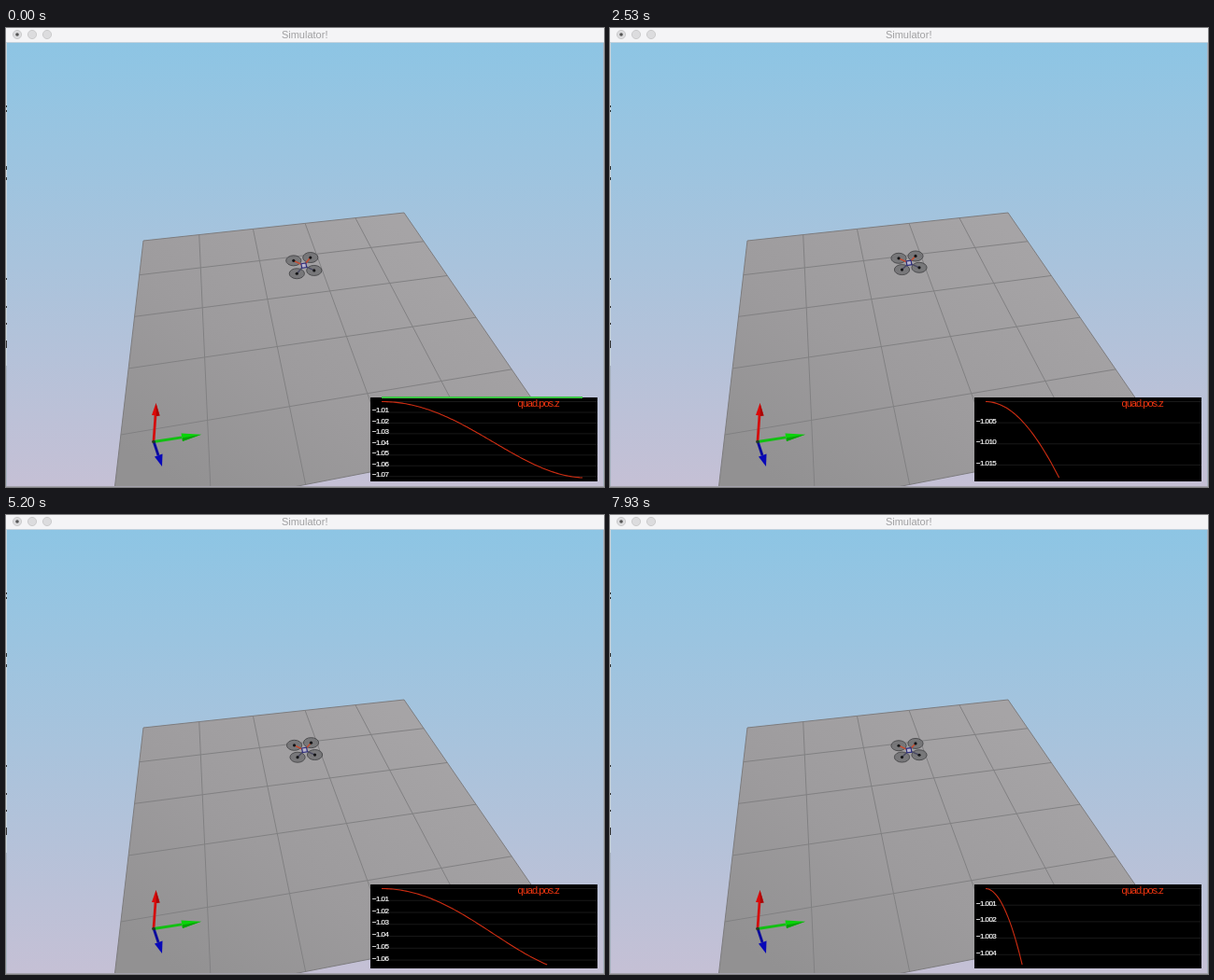
Write an HTML page that moves like this. It is 640 px wide and 492 px high and loops after 8 s.

```html
<!DOCTYPE html>
<html lang="en">
<head>
<meta charset="utf-8">
<title>Simulator</title>
<style>
html, body { margin: 0; width: 100%; height: 100%; overflow: hidden; background: #c4c1d6; }
svg { display: block; width: 100%; height: 100%; }
text { font-family: "Liberation Sans", Arial, sans-serif; }
</style>
</head>
<body>
<svg viewBox="0 0 640 492">
  <defs>
    <linearGradient id="sky" x1="0" y1="0" x2="0" y2="1">
      <stop offset="0" stop-color="#8dc5e4"/>
      <stop offset=".5" stop-color="#a9c3dc"/>
      <stop offset="1" stop-color="#c5c0d5"/>
    </linearGradient>
    <linearGradient id="shade" gradientUnits="userSpaceOnUse" x1="400" y1="200" x2="200" y2="500">
      <stop offset="0" stop-color="#a6a4a6"/>
      <stop offset=".55" stop-color="#9d9b9d"/>
      <stop offset="1" stop-color="#929192"/>
    </linearGradient>
  </defs>
  <rect y="15" width="640" height="477" fill="url(#sky)"/>
  <path id="floor" fill="url(#shade)" stroke="#7d7c7e"/>
  <path id="grid" fill="none" stroke="#818082"/>

  <g id="axes">
    <path d="M158 443L160 415" stroke="#d40d0d" stroke-width="2.8"/>
    <path d="M160.5 402L164.5 415.5L156 415Z" fill="#dc0808"/>
    <path d="M160.5 402L164.5 415.5L161 416Z" fill="#a80505"/>
    <path d="M158 443.5L188 438.8" stroke="#12c012" stroke-width="2.8"/>
    <path d="M209 435.8L187.5 434.5L189 443Z" fill="#08d408"/>
    <path d="M209 435.8L188.5 439.5L189 443Z" fill="#08a008"/>
    <path d="M158 443L163 458" stroke="#0a0a9c" stroke-width="2.8"/>
    <path d="M167 470L159 459.5L167.5 456.5Z" fill="#0808b8"/>
    <circle cx="158" cy="443.5" r="1.8" fill="#223a22"/>
  </g>

  <g id="drone"></g>

  <rect x="390" y="396" width="243" height="90" fill="#000"/>
  <g id="ticks" font-size="8" letter-spacing="-.6" fill="#fff"></g>
  <path id="curve" fill="none" stroke="#cf2d12" stroke-width="1.1"/>
  <path id="ok" stroke="#3cc544" stroke-width="2.2"/>
  <text x="547.5" y="405.7" font-size="11" letter-spacing="-.95" fill="#ee3510">quad.pos.z</text>

  <rect width="640" height="15" fill="#f4f4f6"/>
  <path d="M0 15.5H640" stroke="#c3d3de"/>
  <g fill="#dcdcde" stroke="#c4c4c6" stroke-width=".8">
    <circle cx="12" cy="7" r="4.6"/><circle cx="28" cy="7" r="4.6"/><circle cx="44" cy="7" r="4.6"/>
  </g>
  <circle cx="12" cy="7" r="1.8" fill="#555"/>
  <text x="319.7" y="11" font-size="11" fill="#a0a0a2" text-anchor="middle">Simulator!</text>

  <path d="M.5 16V362" stroke="#c9d6df"/>
  <path d="M.5 362V492M639.5 16V492" stroke="#a9b4c2"/>
  <path d="M.5 83v2m0 3v2M.5 148v4m0 8v3M.5 268v2m0 28v2m0 16v2M.5 335v8" stroke="#333"/>
  <path d="M0 491.5H640" stroke="#a3a1ab"/>
</svg>
<script>
const NS = "http://www.w3.org/2000/svg";
const $ = id => document.getElementById(id);

function set(el, attrs) {
  for (const k in attrs) el.setAttribute(k, attrs[k]);
}
function add(parent, tag, attrs) {
  const el = document.createElementNS(NS, tag);
  set(el, attrs);
  return parent.appendChild(el);
}

// Perspective map of the unit square onto the corners a, b, c, d
function perspective(a, b, c, d) {
  const sub = (p, q) => [p[0] - q[0], p[1] - q[1]];
  const cross = (p, q) => p[0] * q[1] - p[1] * q[0];
  const e = sub(b, c), f = sub(d, c);
  const s = sub(sub(a, b), sub(d, c));
  const g = cross(s, f) / cross(e, f), h = cross(e, s) / cross(e, f);
  return (u, v) => [0, 1].map(i =>
    (a[i] + u * (b[i] * (1 + g) - a[i]) + v * (d[i] * (1 + h) - a[i])) / (1 + g * u + h * v));
}

function drawFloor() {
  const corners = [[147, 228], [426, 198], [590, 437], [112, 530]];
  const at = perspective(...corners);
  let d = "";
  for (let k = .2; k < .9; k += .2)
    d += `M${at(k, 0)}L${at(k, 1)}M${at(0, k)}L${at(1, k)}`;
  set($("floor"), { d: `M${corners.join("L")}Z` });
  set($("grid"), { d });
}

const LOOP = 8000, RUN = 6470, START = 400;
const X0 = 402, TOP = 400.5, HEIGHT = 81.5;
const SPEED = .0369, WIDTH = 215, CLIMB = .0712;

// Height gained once the plot is u wide
const climb = u => CLIMB * Math.sin(Math.PI / 2 * u * (.0041 + 2.1e-6 * u)) ** 2;

// side: left 1, right -1; end: front 1, back -1
const rotors = [
  { x: 309, y: 247.3, side: 1, end: -1 },
  { x: 327, y: 245, side: -1, end: -1 },
  { x: 312.5, y: 259.6, side: 1, end: 1 },
  { x: 331, y: 257.3, side: -1, end: 1 }
];

const drone = $("drone");
for (const r of rotors)
  r.disc = add(drone, "ellipse", { rx: 8.1, ry: 5.5, fill: "#727274", "fill-opacity": .88, stroke: "#474749", "stroke-width": .9 });
for (const r of rotors) {
  r.arm = add(drone, "path", { stroke: r.end < 0 ? "#cc4a2c" : "#4a4a62", "stroke-width": 1.4 });
  r.hub = add(drone, "circle", { r: 1.6, fill: "#141416" });
}
const body = add(drone, "path", { fill: "#b9b4cc", stroke: "#30307c", "stroke-width": 1.2 });

const ticks = Array.from({ length: 8 }, () => ({
  line: add($("ticks"), "path", { stroke: "#191919" }),
  label: add($("ticks"), "text", { x: 392, stroke: "#fff", "stroke-width": .2 })
}));

// The drone climbs, then tilts and drifts towards the viewer
function drawDrone(width) {
  const drift = (width / WIDTH) ** 5;
  const dx = -1.2 * drift, dy = .1 - 36 * climb(width) + 4.8 * drift;
  const cx = 319.9 + dx, cy = 252.4 + dy;
  for (const r of rotors) {
    const x = r.x + dx, y = r.y + dy + drift * (.5 * r.side + .8 * r.end);
    set(r.disc, { cx: x, cy: y });
    set(r.hub, { cx: x, cy: y });
    set(r.arm, { d: `M${cx} ${cy}L${x} ${y}` });
  }
  set(body, { d: `M${cx - 2.8} ${cy - 2}l5-.8l.8 4.6l-5 .8Z` });
}

// Smallest 1-2-5 step that gives at most seven ticks
function tickStep(range) {
  for (let k = -6; ; k++)
    for (const m of [1, 2, 5])
      if (range / (m * 10 ** k) < 7.5) return [m * 10 ** k, -k];
}

function drawGraph(width) {
  const range = Math.max(climb(width), .00005);
  const toY = z => TOP + HEIGHT * z / range;
  const point = u => `L${X0 + u} ${toY(climb(u)).toFixed(2)}`;

  let d = `M${X0} ${TOP}`;
  for (let u = 2; u < width; u += 2) d += point(u);
  set($("curve"), { d: d + point(width) });
  set($("ok"), { d: width > 195 ? `M${X0} 396H${X0 + width}` : "" });

  const [step, digits] = tickStep(range);
  ticks.forEach(({ line, label }, n) => {
    const z = n * step, y = toY(z), shown = z <= range;
    set(line, { d: shown ? `M${X0} ${y}H633` : "" });
    set(label, { y: y + .5 });
    label.textContent = shown && n ? "−" + (1 + z).toFixed(digits) : "";
  });
}

function render(t) {
  const run = (t - START + RUN) % RUN;
  const width = Math.min(WIDTH, run * SPEED);
  drawDrone(width);
  drawGraph(width);
}

const t0 = performance.now();
function tick() {
  render((performance.now() - t0) % LOOP);
  requestAnimationFrame(tick);
}
drawFloor();
render(0);
requestAnimationFrame(tick);
</script>
</body>
</html>
```
